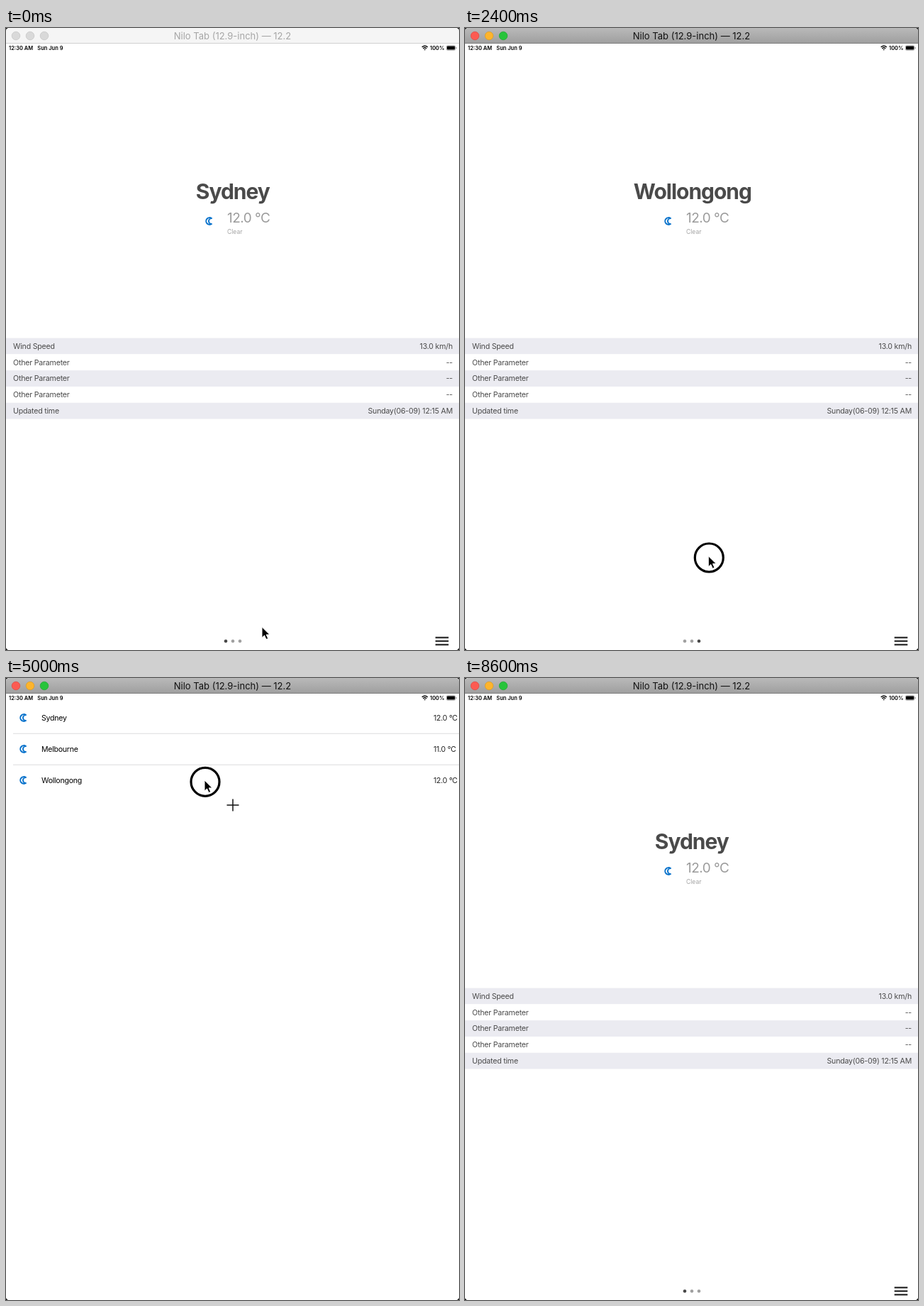
Recreate the animation shown at these times as an HTML page. Size 639 by 876 pixels, loop 8.99 s.

```html
<!DOCTYPE html>
<html lang="en">
<head>
<meta charset="utf-8">
<title>Weather</title>
<style>
  html, body { margin: 0; width: 100%; height: 100%; overflow: hidden; background: #161616; }
  svg { display: block; width: 639px; height: 876px; }
  text { font-family: Inter, "Open Sans", sans-serif; white-space: pre; }
  .row { font-size: 10.6px; letter-spacing: -.019em; fill: #4a4a4a; }
  .city { font-size: 30px; font-weight: 700; letter-spacing: -.034em; fill: #4a4a4a; }
  .temp { font-size: 19px; letter-spacing: -.028em; fill: #9b9b9b; }
  .clear { font-size: 8.6px; fill: #a4a4a4; }
  .item { font-size: 10.6px; letter-spacing: -.025em; fill: #000; }
  .status { font-size: 7.5px; font-weight: 600; fill: #000; }
  .end { text-anchor: end; }
  .mid { text-anchor: middle; }
</style>
</head>
<body>
<svg viewBox="0 0 639 876">
  <defs>
    <linearGradient id="bar" x2="0" y2="1">
      <stop offset="0" stop-color="#b9b9b9"/><stop offset="1" stop-color="#9f9f9f"/>
    </linearGradient>
    <clipPath id="win"><rect width="639" height="876" rx="4.5"/></clipPath>
    <path id="moon" d="M4-4A4.9 4.9 0 1 0 4 4A4 4 0 0 1 4-4Z" fill="none"
      stroke="#0c74cc" stroke-width="2" stroke-linejoin="round"/>
  </defs>
  <g clip-path="url(#win)">
    <rect width="639" height="876" fill="#fff"/>
    <g id="screen"></g>
    <g id="status">
      <text class="status" x="4" y="30.7">12:30 AM</text>
      <text class="status" x="44.3" y="30.7">Sun Jun 9</text>
      <text class="status" x="598" y="30.7">100%</text>
      <g fill="none" stroke="#000" stroke-width="1.4">
        <path d="M586.8 27a5.6 5.6 0 0 1 8 0M588.4 28.9a3.4 3.4 0 0 1 4.8 0"/>
      </g>
      <path d="M589.6 30.2a1.8 1.8 0 0 1 2.4 0l-1.2 1.3z"/>
      <rect x="621.3" y="24.9" width="12.6" height="6.4" rx="1.6" fill="none" stroke="#777" stroke-width=".6"/>
      <rect x="622" y="25.6" width="11.2" height="5" rx="1"/>
      <path d="M634.6 27v2.2q1-.3 1-1.1t-1-1.1z" fill="#555"/>
    </g>
    <g id="chrome">
      <rect id="barFill" width="639" height="21.5"/>
      <rect id="barLine" y="21" width="639" height="1"/>
      <circle cx="14" cy="11" r="5.8"/><circle cx="34" cy="11" r="5.8"/><circle cx="54" cy="11" r="5.8"/>
      <text id="caption" class="mid" x="319.5" y="16" font-size="13">Nilo Tab (12.9-inch) — 12.2</text>
    </g>
    <circle id="ring" r="20" fill="none" stroke="#000" stroke-width="3.2"/>
    <path id="arrow" d="M0 0V15.2L3.5 11.9L6 17.5L8.7 16.3L6.2 10.9H11Z" stroke="#fff" stroke-width="1"/>
    <path id="resize" d="M-3.5 0L1-4.2V-1.3H7V-4.2L11.5 0L7 4.2V1.3H1V4.2Z" stroke="#fff" stroke-width=".8"/>
  </g>
</svg>
<script>
const W = 639, LOOP = 8990, SHADE = '#ebebf1';
const $ = id => document.getElementById(id);
const lerp = (a, b, k) => a + (b - a) * k;
const clamp = k => Math.min(1, Math.max(0, k));

function add(parent, tag, attrs, text) {
  const el = document.createElementNS('http://www.w3.org/2000/svg', tag);
  for (const k in attrs) el.setAttribute(k, attrs[k]);
  if (text) el.textContent = text;
  parent.appendChild(el);
  return el;
}
const move = (el, x, y) => el.setAttribute('transform', `translate(${x} ${y})`);
const show = (el, on) => el.setAttribute('visibility', on ? 'inherit' : 'hidden');
const label = (g, cls, x, y, s) => add(g, 'text', { class: cls, x, y }, s);
const moon = (g, x, y) => add(g, 'use', { href: '#moon', x, y });

const cities = [
  { name: 'Sydney', temp: '12.0 °C', wind: '13.0 km/h', left: 267.8, y: 56 },
  { name: 'Melbourne', temp: '11.0 °C', wind: '11.0 km/h', left: 244.8, y: 100 },
  { name: 'Wollongong', temp: '12.0 °C', wind: '13.0 km/h', left: 237.8, y: 144 }
];

const screen = $('screen');

// City list
const list = add(screen, 'g', {});
add(list, 'rect', { width: W, height: 876, fill: '#fff' });
for (const y of [78, 122]) add(list, 'rect', { x: 10, y: y - .2, width: 629, height: .8, fill: '#d2d2d4' });
const items = cities.map(c => {
  const g = add(list, 'g', {});
  moon(g, 24, c.y);
  label(g, 'item', 50, c.y + 3.8, c.name);
  label(g, 'item', 603, c.y + 3.8, c.temp).style.fill = '#222';
  return g;
});
add(list, 'path', { d: 'M311.5 179h17M320 170.5v17', stroke: '#111', 'stroke-width': 1.5 });
const flyTemp = add(screen, 'text', { class: 'temp' });

// Weather pages
function makePage(index, shaded, time) {
  const c = cities[index], g = add(screen, 'g', {});
  add(g, 'rect', { y: 21, width: W, height: 855, fill: shaded ? SHADE : '#fff' });
  const hero = add(g, 'g', {});
  label(hero, 'city', c.left, 240.5, c.name);
  moon(hero, 286, 272);
  label(hero, 'temp', 312, 274, c.temp);
  label(g, 'clear', 312, 290.2, 'Clear');
  const rows = [['Wind Speed', c.wind], ...Array(3).fill(['Other Parameter', '--']), ['Updated time', time]];
  rows.forEach(([name, value], i) => {
    const y = 436.6 + i * 22.8;
    add(g, 'rect', { y, width: W, height: 22.8, fill: i % 2 ? '#fff' : SHADE });
    label(g, 'row', 10, y + 15.2, name);
    label(g, 'row end', 630, y + 15.2, value);
  });
  for (let i = 0; i < 3; i++)
    add(g, 'circle', { cx: 310 + i * 10, cy: 863.5, r: 2.3, fill: i === index ? '#454545' : '#9f9f9f' });
  add(g, 'path', { d: 'M605.7 858.5h18.6M605.7 863.5h18.6M605.7 868.5h18.6', stroke: '#111', 'stroke-width': 1.8 });
  return { g, hero, index };
}
const early = 'Sunday(06-09) 12:15 AM';
const pages = [
  makePage(0, false, early), makePage(1, true, early), makePage(2, false, early),
  makePage(0, true, early), makePage(2, false, 'Sunday(06-09) 12:30 AM')
];
const flyName = add(screen, 'text', { class: 'city' });
const flyMoon = add(screen, 'use', { href: '#moon' });

// Swipes: press, release, finger travel
const swipes = [[730, 930, 120], [1600, 1800, 117], [2410, 2530, 114]];
const SETTLE = 312;
function scrolled(t) {
  let sum = 0;
  for (const [a, b, d] of swipes)
    sum += t < b ? d * clamp((t - a) / (b - a)) : W - (W - d) * (1 - clamp((t - b) / SETTLE)) ** 3;
  return sum;
}

// Page <-> list changes: start, page, opening
const FLIGHT = 340;
const flights = [[4100, 3, false], [5080, 4, true], [7560, 4, false], [8000, 0, true]];

const path = [
  [0, 361, 843.5], [480, 361, 843.5], [700, 392, 770], [730, 392, 768], [930, 272, 757], [1070, 268.7, 755.5],
  [1250, 268, 755], [1560, 385, 748], [1600, 385, 748], [1800, 268, 750], [1950, 268, 750], [2330, 343.3, 743.7],
  [2410, 343.3, 743.7], [2530, 230, 752], [2600, 240, 755], [2870, 472.6, 815.3], [3150, 560, 846],
  [3700, 614, 861], [4030, 614, 861], [4270, 467, 806.6], [4850, 280, 144], [5060, 280, 144], [5500, 400, 520],
  [5870, 635, 763.5], [6000, 622, 775], [6530, 600, 800], [6670, 600, 800], [7300, 614, 861], [7520, 614, 861],
  [7830, 250, 54], [7980, 250, 54], [8250, 270, 12], [8400, 290, -30]
];
const presses = [[400, 470], [730, 930], [1600, 1800], [2380, 2530], [3850, 4000], [4930, 5040], [7390, 7500], [7880, 7960]];

function cursorAt(t) {
  let i = 1;
  while (i < path.length - 1 && path[i][0] < t) i++;
  const [a, x0, y0] = path[i - 1], [b, x1, y1] = path[i], k = clamp((t - a) / (b - a));
  return [lerp(x0, x1, k), lerp(y0, y1, k)];
}

function drawScreen(t) {
  const flight = flights.filter(f => t >= f[0]).pop();
  let flying = false;
  show(list, !!flight);
  for (const p of pages) { show(p.g, false); show(p.hero, true); }
  for (const r of items) show(r, true);

  if (!flight) {
    const s = scrolled(t);
    for (let i = 0; i < 4; i++) {
      const x = Math.max(0, Math.round(i * W - s));
      show(pages[i].g, x < W);
      move(pages[i].g, x, 0);
    }
  } else {
    const [start, n, opening] = flight;
    const left = 1 - clamp((t - start) / FLIGHT), page = pages[n], c = cities[page.index];
    const x = W * (opening ? left ** 3 : 1 - left ** 3);
    const p = opening ? 1 - left ** 2 : left ** 2;
    flying = left > 0;
    show(page.g, x < W);
    move(page.g, x, 0);
    show(page.hero, !flying);
    show(items[page.index], !flying);
    if (flying) fly(c, p);
  }
  for (const el of [flyName, flyMoon, flyTemp]) show(el, flying);
}

// p runs from the list row (0) to the page (1)
function fly(c, p) {
  const place = (el, s, x, y, size, from, to) => {
    const v = Math.round(lerp(from, to, p));
    el.textContent = s;
    el.setAttribute('x', x);
    el.setAttribute('y', y + size * .36);
    el.style.fontSize = size + 'px';
    el.style.fill = `rgb(${v},${v},${v})`;
  };
  place(flyName, c.name, lerp(50, c.left, p), lerp(c.y, 230, p), lerp(10.6, 30, p), 60, 74);
  flyName.style.fontWeight = Math.round(lerp(400, 700, p));
  flyName.style.letterSpacing = lerp(-.025, -.034, p) + 'em';
  place(flyTemp, c.temp, lerp(603, 312, p), lerp(c.y, 267, p), lerp(10.6, 19, p), 34, 155);
  move(flyMoon, lerp(24, 286, p), lerp(c.y, 272, p));
}

const lights = [...$('chrome').querySelectorAll('circle')];
const lit = [['#fc5b52', '#dd463f'], ['#fdb42c', '#dc9a20'], ['#28c43b', '#1fa52f']];
function drawChrome(active) {
  $('barFill').setAttribute('fill', active ? 'url(#bar)' : '#f5f5f5');
  $('barLine').setAttribute('fill', active ? '#7d7d7d' : '#d0d0d0');
  $('caption').setAttribute('fill', active ? '#111' : '#a6a6a6');
  lights.forEach((el, i) => {
    const [fill, edge] = active ? lit[i] : ['#d9d9d9', '#c3c3c3'];
    el.setAttribute('fill', fill);
    el.setAttribute('stroke', edge);
    el.setAttribute('stroke-width', .7);
  });
}

function render(t) {
  drawScreen(t);
  drawChrome(t >= 400);
  const [x, y] = cursorAt(t), edge = x >= 628;
  show($('arrow'), !edge);
  show($('resize'), edge);
  move($('arrow'), x, y);
  move($('resize'), x, y);
  move($('ring'), x + 1, y + 2.3);
  show($('ring'), presses.some(([a, b]) => t >= a && t < b));
}

const begin = performance.now();
function tick() {
  render((performance.now() - begin) % LOOP);
  requestAnimationFrame(tick);
}
tick();
</script>
</body>
</html>
```
